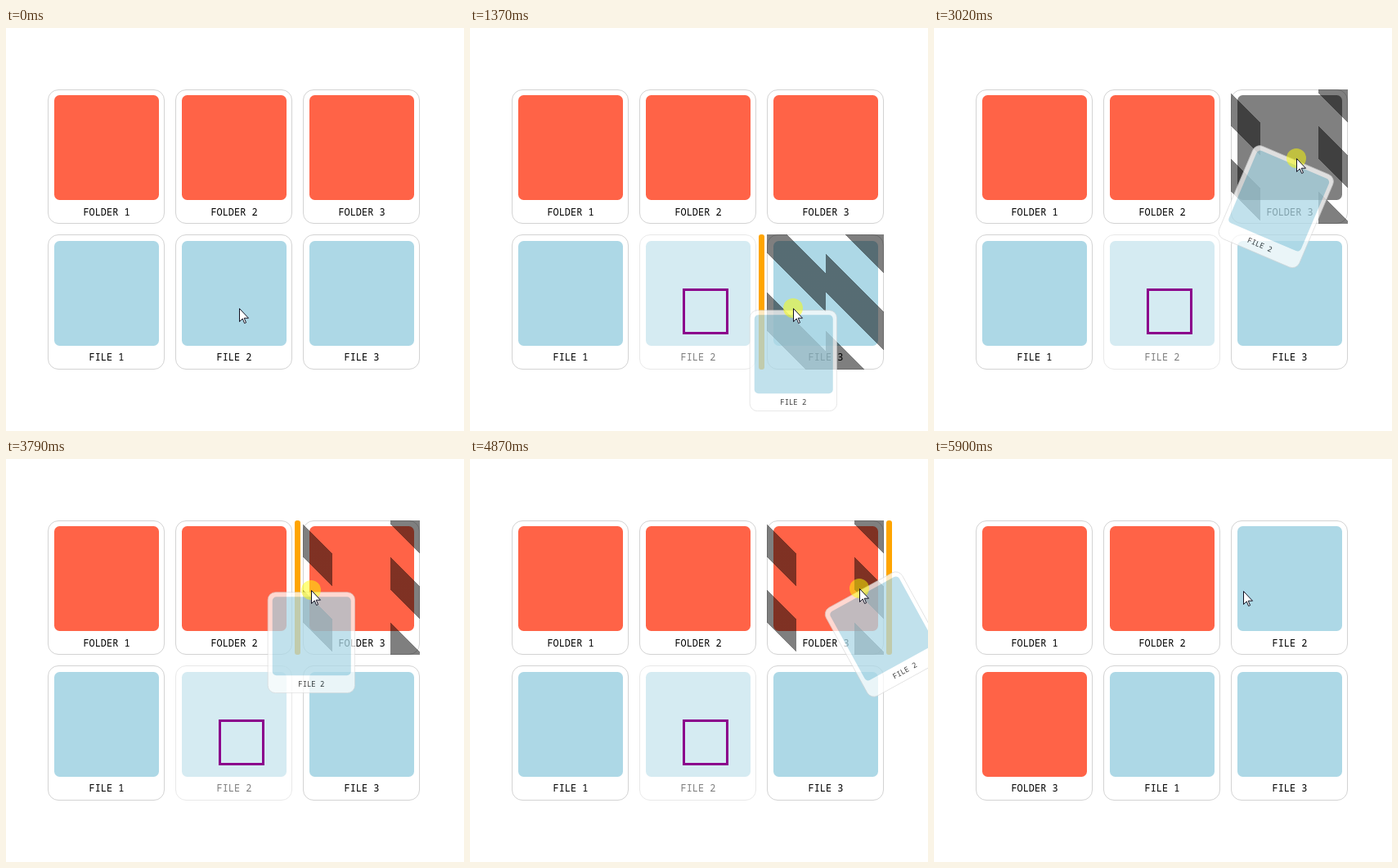
Recreate the animation shown at these times as an HTML page. Size 560 px wide and 492 px high, loop 6.25 s.

```html
<!DOCTYPE html>
<html lang="en">
<head>
<meta charset="utf-8">
<title>Drag and drop</title>
<style>
  html, body { margin: 0; width: 100%; height: 100%; overflow: hidden; background: #fff; }
  #stage { position: relative; width: 560px; height: 492px; overflow: hidden; }
  #stage div, #stage svg { position: absolute; box-sizing: border-box; }
  .card {
    width: 143px; height: 164px; background: #fff;
    border: 1px solid lightgray; border-radius: 13px;
    font: 11.9px/15px "Noto Sans Mono", "DejaVu Sans Mono", monospace;
    text-align: center; white-space: pre; color: #000;
  }
  .card.low { height: 165px; }
  .tile { left: 7px; top: 6px; width: 128px; height: 128px; border-radius: 6.5px; }
  .low .tile { top: 7px; }
  .label { left: .5px; top: 141px; width: 141px; }
  #before {
    background: linear-gradient(45deg, transparent 20%, #00000080 20% 40%,
      transparent 40% 60%, #00000080 60% 80%, transparent 80%);
  }
  #after {
    background: linear-gradient(45deg, #00000080 20%, transparent 20% 40%,
      #00000080 40% 60%, transparent 60% 80%, #00000080 80%);
  }
  #bar { background: orange; border-radius: 3px; }
  #threshold { left: 260px; top: 318px; width: 56px; height: 56px; border: 3px solid darkmagenta; }
  #ghost { left: 0; top: 0; transform-origin: 0 0; opacity: .75; }
  #ghost .card { left: -71.5px; top: 2.5px; }
  #pointer { left: 0; top: 0; }
  #press { left: -12px; top: -12px; width: 24px; height: 24px; border-radius: 50%; background: #ffff0080; }
  #pointer svg { left: 0; top: 0; overflow: visible; }
</style>
</head>
<body>
<div id="stage">
  <div id="cards"></div>
  <div id="before"></div>
  <div id="after"></div>
  <div id="bar"></div>
  <div id="threshold"></div>
  <div id="ghost"></div>
  <div id="pointer">
    <div id="press"></div>
    <svg width="13" height="20">
      <path d="M.5 .5v16l3.7-3.6 2.4 5.6 2-.9-2.4-5.4h5.3z" fill="#fff" stroke="#112"/>
    </svg>
  </div>
</div>
<script>
const LOOP = 6250, HOVER = 70, PRESS = 400, DRAG = 810, DROP = 5900, TICK = 70;
const COLUMNS = [51, 207, 363], ROWS = [75, 252], CARD_WIDTH = 143;
const SWING_LAG = 140, SWING_GAIN = 2.4, SWING_LIMIT = 30;

// Turning points and rests of the dragging pointer: time, x, y.
const PATH = [
  [810, 318, 350], [1230, 395, 342], [1430, 395, 342], [1850, 446, 352], [1950, 446, 352],
  [2330, 392, 354], [2670, 392, 354], [2880, 433.4, 250], [3020, 443, 159], [3160, 458, 157],
  [3230, 456, 159], [3650, 373, 160], [3790, 373, 160], [4000, 408, 155], [4490, 494, 158],
  [4660, 494, 158], [4870, 476, 158], [5300, 381, 161], [5440, 378, 161]
];

const ORDER = ["FOLDER 1", "FOLDER 2", "FOLDER 3", "FILE 1", "FILE 2", "FILE 3"];
const DROPPED = ["FOLDER 1", "FOLDER 2", "FILE 2", "FOLDER 3", "FILE 1", "FILE 3"];

const $ = id => document.getElementById(id);
const show = (id, visible) => { $(id).style.display = visible ? "block" : "none"; };
const place = (el, left, top, width, height) =>
  Object.assign(el.style, { left: left + "px", top: top + "px", width: width + "px", height: height + "px" });

function makeCard(parent, low) {
  const card = document.createElement("div");
  card.className = low ? "card low" : "card";
  card.innerHTML = '<div class="tile"></div><div class="label"></div>';
  parent.append(card);
  return card;
}

function fillCard(card, name, into = false) {
  const color = into ? "gray" : name.startsWith("FOLDER") ? "tomato" : "lightblue";
  card.firstChild.style.background = color;
  card.lastChild.textContent = name;
}

const cards = ROWS.flatMap((top, row) => COLUMNS.map(left => {
  const card = makeCard($("cards"), row === 1);
  card.style.left = left + "px";
  card.style.top = top + "px";
  return card;
}));
fillCard(makeCard($("ghost"), true), "FILE 2");

const segmentAt = time => Math.max(0, PATH.findLastIndex(([start]) => start <= time));

// The picture advances in ticks counted from the last turning point.
function snap(time) {
  const start = PATH[segmentAt(time)][0];
  return start + Math.floor((time - start) / TICK) * TICK;
}

function pathAt(time) {
  const i = segmentAt(time), a = PATH[i], b = PATH[i + 1] || a;
  const p = Math.max(0, (time - a[0]) / (b[0] - a[0] || 1));
  return [1, 2].map(k => a[k] + (b[k] - a[k]) * (b === a ? 0 : p));
}

// The card hangs from the pointer and trails behind its sideways movement.
function poseAt(time) {
  if (time < DRAG) return [285, time < HOVER ? 342 : 343, 0];
  const t = snap(time), [x, y] = pathAt(t);
  const swing = (x - pathAt(t - SWING_LAG)[0]) * SWING_GAIN;
  return [x, y, Math.max(-SWING_LIMIT, Math.min(SWING_LIMIT, swing))];
}

// Marks the drop zones of the hovered card; returns whether the drop goes into it.
function drawTarget(x, y, dragging) {
  const active = dragging && x > 350;
  const row = y < 246 ? 0 : 1, top = ROWS[row], left = COLUMNS[2], right = left + CARD_WIDTH;
  const height = 164 + row;
  const zone = CARD_WIDTH / (row ? 2 : 4);
  const isBefore = x < left + zone, isAfter = x >= right - zone;
  place($("before"), left, top, zone, height);
  place($("after"), right - zone, top, zone, height);
  place($("bar"), isBefore ? left - 10 : right + 3, top, 7, height);
  show("before", active);
  show("after", active);
  show("bar", active && (isBefore || isAfter));
  return active && !isBefore && !isAfter;
}

function draw() {
  const time = performance.now() % LOOP;
  const dragging = time >= DRAG && time < DROP, pressed = time >= PRESS && time < DROP;
  const [x, y, swing] = poseAt(time);
  const into = drawTarget(x, y, dragging);
  const names = time < DROP ? ORDER : DROPPED;
  cards.forEach((card, i) => {
    fillCard(card, names[i], into && i === 2);
    card.style.opacity = dragging && names[i] === "FILE 2" ? .5 : 1;
  });
  show("threshold", pressed);
  show("press", pressed);
  show("ghost", dragging);
  $("ghost").style.transform = `translate(${x}px, ${y}px) rotate(${swing}deg) scale(.75)`;
  $("pointer").style.transform = `translate(${Math.round(x)}px, ${Math.round(y)}px)`;
  requestAnimationFrame(draw);
}
draw();
</script>
</body>
</html>
```
